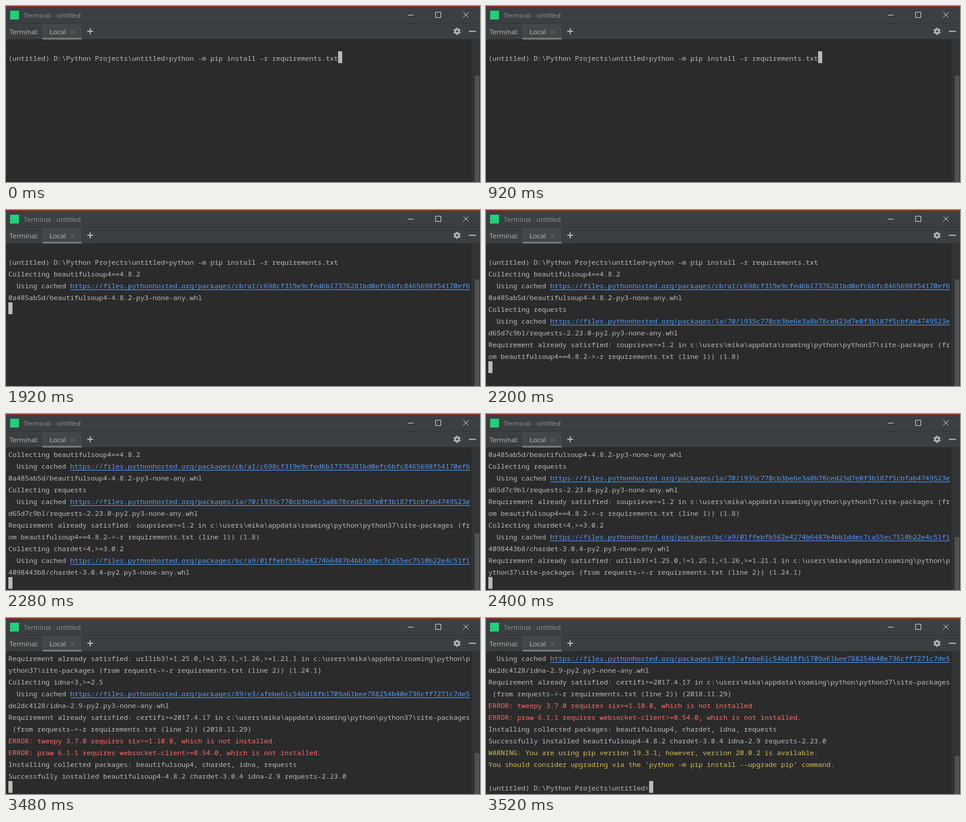
Write an HTML page with a canvas that moves like this. It is 805 px wide and 299 px high and loops after 3.96 s.

```html
<!DOCTYPE html>
<html lang="en">
<head>
<meta charset="utf-8">
<title>Terminal</title>
<style>
html, body { margin: 0; width: 100%; height: 100%; overflow: hidden; background: #2b2b2b; }
canvas { display: block; }
</style>
</head>
<body>
<canvas id="stage" width="805" height="299"></canvas>
<script>
const ctx = document.getElementById('stage').getContext('2d');
const LOOP = 3960, ROWS = 12, CELL_W = 7, CELL_H = 20, LEFT = 4, TOP = 57;
const MONO = '11.667px "Noto Sans Mono", "DejaVu Sans Mono", monospace';
const SANS = '11.4px "Open Sans", "Noto Sans", sans-serif';
const TEXT = '#bbbbbb', LINK = '#589df6', ERROR = '#ff6b68', WARN = '#d6bf55', ICON = '#afb1b3';

const lines = String.raw`
(untitled) D:\Python Projects\untitled>python -m pip install -r requirements.txt
Collecting beautifulsoup4==4.8.2
  Using cached https://files.pythonhosted.org/packages/cb/a1/c698cf319e9cfed6b17376281bd0efc6bfc8465698f54170ef6
0a485ab5d/beautifulsoup4-4.8.2-py3-none-any.whl
Collecting requests
  Using cached https://files.pythonhosted.org/packages/1a/70/1935c770cb3be6e3a8b78ced23d7e0f3b187f5cbfab4749523e
d65d7c9b1/requests-2.23.0-py2.py3-none-any.whl
Requirement already satisfied: soupsieve>=1.2 in c:\users\mika\appdata\roaming\python\python37\site-packages (fr
om beautifulsoup4==4.8.2->-r requirements.txt (line 1)) (1.8)
Collecting chardet<4,>=3.0.2
  Using cached https://files.pythonhosted.org/packages/bc/a9/01ffebfb562e4274b6487b4bb1ddec7ca55ec7510b22e4c51f1
4098443b8/chardet-3.0.4-py2.py3-none-any.whl
Requirement already satisfied: urllib3!=1.25.0,!=1.25.1,<1.26,>=1.21.1 in c:\users\mika\appdata\roaming\python\p
ython37\site-packages (from requests->-r requirements.txt (line 2)) (1.24.1)
Collecting idna<3,>=2.5
  Using cached https://files.pythonhosted.org/packages/89/e3/afebe61c546d18fb1709a61bee788254b40e736cff7271c7de5
de2dc4128/idna-2.9-py2.py3-none-any.whl
Requirement already satisfied: certifi>=2017.4.17 in c:\users\mika\appdata\roaming\python\python37\site-packages
 (from requests->-r requirements.txt (line 2)) (2018.11.29)
ERROR: tweepy 3.7.0 requires six>=1.10.0, which is not installed.
ERROR: praw 6.1.1 requires websocket-client>=0.54.0, which is not installed.
Installing collected packages: beautifulsoup4, chardet, idna, requests
Successfully installed beautifulsoup4-4.8.2 chardet-3.0.4 idna-2.9 requests-2.23.0
WARNING: You are using pip version 19.3.1; however, version 20.0.2 is available.
You should consider upgrading via the 'python -m pip install --upgrade pip' command.

(untitled) D:\Python Projects\untitled>`.split('\n');

// [start ms, cursor line, cursor column, cursor hidden]
const steps = [
  [0, 1, 80], [400, 1, 80, true], [920, 1, 80], [1400, 1, 80, true], [1480, 2, 0],
  [1920, 5, 0], [2120, 8, 0], [2160, 10, 0], [2280, 13, 0], [2320, 15, 0],
  [2440, 18, 0], [2520, 23, 0], [3480, 24, 0], [3520, 27, 39]
];

function rect(color, x, y, w, h) {
  ctx.fillStyle = color;
  ctx.fillRect(x, y, w, h);
}

function label(text, x, y, color) {
  ctx.font = SANS;
  ctx.fillStyle = color;
  ctx.fillText(text, x, y);
}

function cross(x, y, size, color) {
  ctx.strokeStyle = color;
  ctx.lineWidth = 1;
  ctx.beginPath();
  ctx.moveTo(x, y);
  ctx.lineTo(x + size, y + size);
  ctx.moveTo(x + size, y);
  ctx.lineTo(x, y + size);
  ctx.stroke();
}

function gear(x, y) {
  ctx.save();
  ctx.translate(x, y);
  for (let i = 0; i < 6; i++) {
    rect(ICON, -1.6, -6, 3.2, 4);
    ctx.rotate(Math.PI / 3);
  }
  ctx.strokeStyle = ICON;
  ctx.lineWidth = 2.6;
  ctx.beginPath();
  ctx.arc(0, 0, 3.3, 0, 7);
  ctx.stroke();
  ctx.restore();
}

function drawHeader() {
  rect('#3c3f41', 0, 0, 805, 57);
  rect('#c22d1c', 0, 0, 805, 1);
  rect('#323435', 0, 29, 805, 1);
  rect('#323232', 0, 56, 805, 1);
  rect('#21d07a', 7, 8, 15, 15);
  label('Terminal - untitled', 30, 20, '#929496');
  rect('#d0d0d0', 682, 15, 10, 1);
  ctx.strokeStyle = '#d0d0d0';
  ctx.lineWidth = 1;
  ctx.strokeRect(729.5, 10.5, 9, 9);
  cross(776.5, 10.5, 9, '#d0d0d0');

  label('Terminal:', 6, 48, TEXT);
  rect('#434749', 62, 30, 66, 24);
  rect('#747a80', 62, 54, 66, 3);
  label('Local', 74, 48, TEXT);
  cross(109.5, 40.5, 7, '#6e7173');
  rect(ICON, 138, 42, 10, 2);
  rect(ICON, 142, 38, 2, 10);
  gear(766, 43);
  rect(ICON, 786, 42, 12, 2);
}

function drawLine(text, y) {
  const url = text.indexOf('https:');
  const base = text.startsWith('ERROR') ? ERROR : /^(WARNING|You should)/.test(text) ? WARN : TEXT;
  ctx.font = MONO;
  [...text].forEach((ch, i) => {
    ctx.fillStyle = url >= 0 && i >= url ? LINK : base;
    ctx.fillText(ch, LEFT + i * CELL_W, y + 16);
  });
  if (url >= 0) rect(LINK, LEFT + url * CELL_W, y + 18, (text.length - url) * CELL_W, 1);
}

function drawTerminal([, row, col, hidden]) {
  const first = Math.max(0, row - ROWS + 1);
  const last = col ? row : row - 1;
  rect('#2b2b2b', 0, TOP, 805, 242);
  rect('#323334', 791, TOP, 14, 242);
  const thumb = first ? 299 - 240 * ROWS / (first + 28) : 118;
  rect('#505153', 796, Math.round(thumb), 8, 299 - Math.round(thumb));
  for (let i = first; i <= last; i++) drawLine(lines[i], TOP + (i - first) * CELL_H);
  if (!hidden) rect(TEXT, LEFT + col * CELL_W, TOP + (row - first) * CELL_H, CELL_W, CELL_H);
}

const start = performance.now();
function frame() {
  const t = (performance.now() - start) % LOOP;
  drawHeader();
  drawTerminal(steps.findLast(s => s[0] <= t));
  requestAnimationFrame(frame);
}
frame();
</script>
</body>
</html>
```
